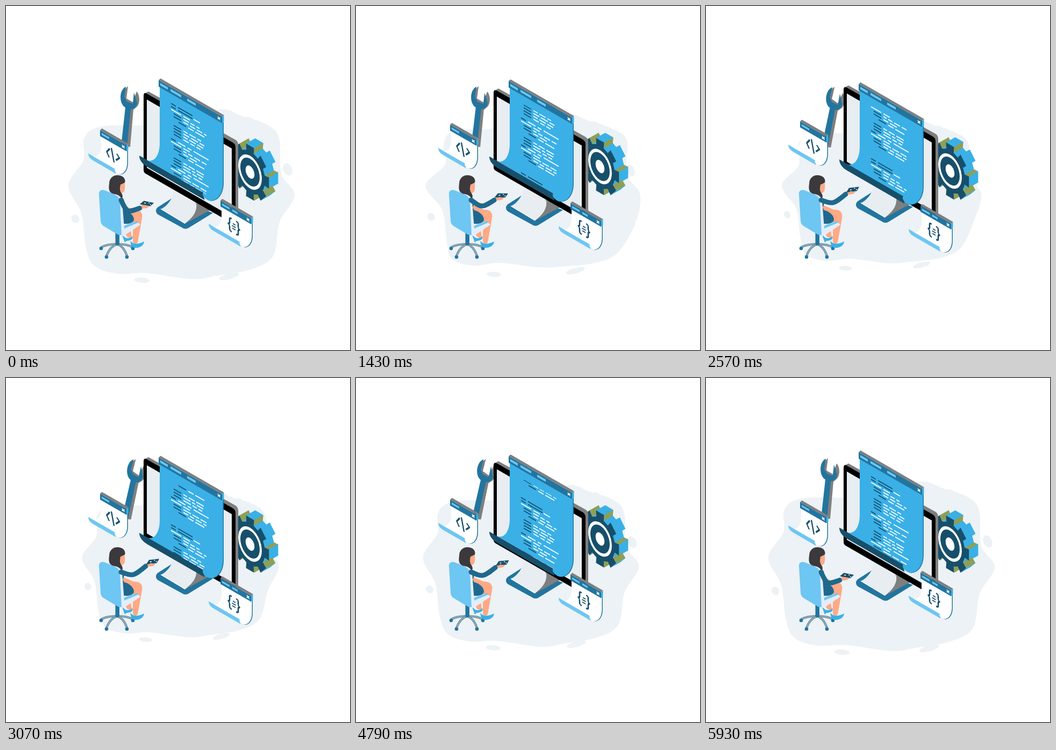
Recreate the animation shown at these times as an HTML page. Size 640 px wide and 640 px high, loop 6000 ms.

```html
<!DOCTYPE html>
<html lang="en">
<head>
<meta charset="utf-8">
<title>Developer at work</title>
<style>
html, body { margin: 0; width: 100%; height: 100%; overflow: hidden; background: #fff; }
svg { display: block; width: 100vw; height: 100vh; }
</style>
</head>
<body>
<svg id="stage" viewBox="0 0 640 640"></svg>
<script>
const LOOP = 6000, SLOPE = 0.577, SCROLL = 167, ROW = 5.4;
const C = {
  blue: '#3ab0e7', mid: '#22759f', navy: '#174f6b', light: '#6ec6f2', grey: '#7f7f7f', jacket: '#1f688d',
  blob: '#ecf2f5', screen: '#e7edf1', olive: '#8f9f55', skin: '#ffa985', hair: '#3b393c', pale: '#e4edfb',
};
const stage = document.getElementById('stage');

function el(parent, tag, attrs = {}) {
  const node = document.createElementNS('http://www.w3.org/2000/svg', tag);
  for (const key in attrs) node.setAttribute(key, attrs[key]);
  parent.appendChild(node);
  return node;
}
const group = (parent = stage, attrs) => el(parent, 'g', attrs);
const fill = (parent, d, color) => el(parent, 'path', { d, fill: color });
const line = (parent, d, color, width, cap = 'butt') => el(parent, 'path', {
  d, fill: 'none', stroke: color, 'stroke-width': width, 'stroke-linecap': cap, 'stroke-linejoin': 'round',
});
const move = (node, x, y) => node.setAttribute('transform', `translate(${x} ${y})`);
const poly = pts => 'M' + pts.map(p => p.join()).join('L') + 'Z';

// Easing
const ease = x => (1 - Math.cos(Math.PI * Math.min(1, Math.max(0, x)))) / 2;
const rise = (t, from, to) => ease((t - from) / (to - from));
const arc = (t, peak, power = 1) =>
  t < peak ? ease((t / peak) ** power) : rise(t, LOOP, peak);

function closedCurve(pts) {
  const n = pts.length, at = i => pts[(i + n) % n];
  let d = 'M' + pts[0].join();
  for (let i = 0; i < n; i++) {
    const [a, b, c, e] = [at(i - 1), at(i), at(i + 1), at(i + 2)];
    const p = [0, 1].map(k => b[k] + (c[k] - a[k]) / 6), q = [0, 1].map(k => c[k] - (e[k] - b[k]) / 6);
    d += `C${p} ${q} ${c}`;
  }
  return d;
}

// Backdrop
const blobPoints = [
  [395, 193], [440, 205], [490, 223], [509, 250], [512, 312], [537, 352], [509, 402],
  [497, 465], [455, 490], [390, 502], [345, 508], [262, 497], [208, 498], [165, 484],
  [149, 450], [140, 385], [116, 334], [144, 287], [146, 245], [180, 224], [290, 220],
];
// Bulges and dents of the bent blob: direction and spread in degrees, size
const bulges = [[16, 13, 26], [-22, 9, 16], [95, 40, -13], [160, 16, -15], [203, 10, -16]];
const backdrop = group();
const blob = fill(backdrop, '', C.blob);
for (const [x, y, rx, ry, turn] of [
  [453, 211, 8, 4, 15], [467, 214, 2.5, 1.5, 20], [524, 304, 8, 12, -25],
  [415, 503, 19, 5.5, -15], [253, 510, 14, 5, 4], [129, 396, 7, 8, -30],
]) el(backdrop, 'ellipse', { cx: x, cy: y, rx, ry, fill: C.blob, transform: `rotate(${turn} ${x} ${y})` });

function bentBlob(amount) {
  return closedCurve(blobPoints.map(([x, y]) => {
    const dx = x - 325, dy = y - 350, angle = Math.atan2(dy, dx) * 180 / Math.PI;
    let push = 0;
    for (const [dir, spread, size] of bulges) {
      const off = (angle - dir + 540) % 360 - 180;
      push += size * Math.exp(-((off / spread) ** 2));
    }
    const k = amount * push / Math.hypot(dx, dy);
    return [x + dx * k, y + dy * k];
  }));
}

// Wrench
const wrench = group();
fill(wrench, 'M227 149L224 172L236 179L243 159C249 165 250 180 244 187L237 193L231 262H217L224 190C214 180 213 160 227 149Z', C.grey);
fill(wrench, 'M223 150C211 155 209 181 222 189L214 262H225L232 192C239 192 244 186 244 180L238 161L236 182L225 178L220 169Z', C.mid);

// Gear
const gear = group();
function buildGear() {
  const project = (r, deg, dx = 0, dy = 0) => {
    const a = deg * Math.PI / 180, x = r * Math.cos(a), y = r * Math.sin(a);
    return [454 + 0.72 * x + dx, 309 + 0.42 * x + y + dy];
  };
  const corners = [];
  for (let k = 0; k < 8; k++)
    for (const [r, a] of [[39, -14], [50, -12], [50, 12], [39, 14]]) corners.push([r, 45 * k + a]);
  const depth = [17, -9.5];
  const front = corners.map(c => project(...c)), back = corners.map(c => project(...c, ...depth));
  fill(gear, poly(back), C.blue);
  front.forEach((p, i) => {
    const j = (i + 1) % front.length, q = front[j];
    const facing = (q[1] - p[1]) * depth[0] - (q[0] - p[0]) * depth[1];
    if (facing > 0) fill(gear, poly([p, q, back[j], back[i]]), i % 2 ? C.blue : C.olive);
  });
  fill(gear, poly(front), C.navy);
  [[30.5, '#fff'], [25, C.navy], [11.5, '#fff']].forEach(([r, color]) =>
    el(gear, 'circle', { r, fill: color, transform: 'matrix(.72 .42 0 1 454 309)' }));
}
buildGear();

// Monitor
const monitor = group();
fill(monitor, 'M279 381Q279 377 283 374L308 358L385 385L341 412Q334 417 327 412L283 388Q279 385 279 381Z', C.mid);
fill(monitor, 'M352 366C357 385 345 393 333 405L372 384L386 377Z', C.grey);
fill(monitor, 'M312 343L354 368C356 385 345 395 333 405L288 378C300 372 310 360 312 343Z', C.screen);
line(monitor, 'M288 377.5L333 404.5', '#fff', 1.2);
fill(monitor, 'M257 163L265 159L427 249Q432 252 432 259V398L424 405Z', C.grey);
fill(monitor, 'M256 167Q256 160 262 163L422 254Q427 257 427 263V400Q427 408 420 404L260 312Q256 310 256 305Z', '#000');
fill(monitor, 'M262 174L420 265V392L262 301Z', C.screen);

// A sheet with a title bar and a rolled lower edge, in skewed coordinates
function makeSheet({ x, y, w, bar, roll, curl, paper, back, tabs }) {
  const outer = group();
  const g = group(outer, { transform: `matrix(1 ${SLOPE} 0 1 ${x} ${y})` });
  const tip = 2 - curl, end = w + 3 - curl, h = curl * 0.33, right = w + 1.5;
  const at = (u, v) => `${end + u * curl} ${roll + v * curl}`;
  const body = `M2 ${bar - 3}H${right}V${roll - 1.05 * curl}C${right} ${roll - 0.5 * curl} ${at(0.7, 0)} ${at(0.35, 0.2)}`
    + `C${at(0.15, 0.315)} ${at(-0.12, 0.2)} ${at(0, 0)}H${-0.53 * curl}`
    + `C${-0.2 * curl} ${roll - 0.1 * curl} 2 ${roll - 0.6 * curl} 2 ${roll - 1.2 * curl}Z`;
  el(g, 'path', { d: body, fill: C.mid, transform: 'translate(1.5 -.4)' });
  fill(g, `M${tip} ${roll}C${tip} ${roll + h * 0.8} ${tip + curl * 0.2} ${roll + h} ${tip + curl * 0.4} ${roll + h}`
    + `H${end + 0.06 * curl}L${end} ${roll}Z`, back);
  fill(g, body, paper);
  fill(g, `M0 0L3.5 -5.2H${w + 3.5}L${w} 0Z`, C.grey);
  fill(g, `M${w} 0L${w + 3.5} -5.2V${bar - 5}L${w} ${bar}Z`, C.blue);
  fill(g, `M0 0H${w}V${bar}H0Z`, C.mid);
  for (const [a, b] of tabs) fill(g, `M${a} 3.5H${b}V${bar - 4}H${a}Z`, C.light);
  line(g, `M${w - 8} ${bar / 2 - 2}l4.4 4.4m0 -4.4l-4.4 4.4`, '#fff', 1.8);
  return { outer, g };
}

const page = makeSheet({
  x: 284, y: 138, w: 118, bar: 12, roll: 161, curl: 38, paper: C.blue, back: C.navy,
  tabs: [[3, 17], [22, 42], [53, 69]],
});

// Scrolling code
const clip = el(el(stage, 'defs'), 'clipPath', { id: 'pageClip' });
el(clip, 'rect', { x: 3, y: 27.5, width: 114, height: 133.5 });
const code = group(group(page.g, { 'clip-path': 'url(#pageClip)' }));
function buildCode() {
  const rowKinds = {
    title: 'd0-9 d13-40', note: 'd0-9 d13-40 w42-54', open: 'w0-19 w23-35',
    head: 'd0-9 w13-27 w31-38 w42-70', inner: 'd14-28 w32-42 w45-62',
  };
  let seed = 11;
  const random = () => (seed = seed * 16807 % 2147483647) / 2147483647;
  const statement = () => {
    let out = 'd5-19', u = 23;
    const stop = 48 + random() * 16;
    while (u < stop) {
      const len = 6 + Math.round(random() * 8);
      out += ` w${u}-${Math.min(u + len, 66)}`;
      u += len + 3;
    }
    return out;
  };
  const blocks = {
    30: 'title note open code code inner', 68: 'code code code code', 95: 'head open code code inner',
    128: 'code code code', 145: 'head open code code inner',
  };
  const paths = { d: '', w: '' };
  for (const top in blocks) blocks[top].split(' ').forEach((kind, i) => {
    for (const part of (rowKinds[kind] || statement()).split(' ')) {
      const [a, b] = part.slice(1).split('-').map(Number);
      for (const shift of [0, SCROLL]) paths[part[0]] += `M${23 + a} ${+top + i * ROW + shift}H${23 + b}`;
    }
  });
  line(code, paths.d, C.navy, 2);
  line(code, paths.w, '#fff', 2);
}
buildCode();

const small = { bar: 11, roll: 56, curl: 24, paper: '#fff', back: C.light };
const tagSheet = makeSheet({ ...small, x: 175, y: 231, w: 49, tabs: [[3, 17]] });
line(tagSheet.g, 'M18 24L12.5 33L17 41M21 21L26 45M31 26L36 31L29.5 39', C.navy, 2.6);
const braceSheet = makeSheet({ ...small, x: 399, y: 362, w: 57, tabs: [[3, 17], [22, 32]] });
for (const side of [-1, 1])
  el(line(braceSheet.g, 'M4 -12Q8 -13 8 -9V-4Q8 -1 10.5 0Q8 1 8 4V9Q8 12 4 12', C.navy, 2.6),
    'desc').parentNode.setAttribute('transform', `translate(25 34) scale(${side} 1)`);
line(braceSheet.g, 'M23 29.5H28M21.5 34H28.5M22 38.5H28', C.navy, 2);

// Chair and woman
const person = group();
for (const [x, y, knee] of [[177, 451, 443], [236, 451, 443], [187, 467, 447], [225, 467, 447]]) {
  const leg = `M207 443Q${(207 + x * 2) / 3} ${knee} ${x} ${y - 2}`;
  line(person, leg, C.grey, 4);
  line(person, leg, C.light, 1.5);
  el(person, 'circle', { cx: x, cy: y, r: 3.3, fill: C.mid });
}
fill(person, 'M203.5 420H211V444Q207 447 203.5 444Z', C.mid);
fill(person, 'M216 426L222 431Q229 434 235 428Q238 436 224 437L221 440Z', C.blue);
fill(person, 'M221 418L232 416L234 430Q228 433 224 428Z', C.skin);
fill(person, 'M217 370L238 379C250 378 255 385 253 395L245 440Q240 445 236 439L236 418L239 402L218 404Z', C.skin);
fill(person, 'M231 437Q240 447 257 438C256 447 248 450 238 450L233 446Z', C.blue);
fill(person, 'M206 350L217 357C222 362 220 370 217 375L220 380C230 382 238 390 238 397C238 405 224 407 215 404Z', C.jacket);
fill(person, 'M219 409L244 400L248 405L220 421Z', C.light);
fill(person, 'M185 342L207 350Q215 353 216 362L220 414L246 403L250 407L223 425Q215 430 210 425Z', C.pale);
fill(person, 'M173 351C172 343 178 341 184 343L203 351Q211 355 212 363L215 426Q210 427 206 424L181 409Q176 405 176 399Z', C.light);
fill(person, 'M192 331C192 318 202 314 210 315C220 316 223 324 221 329C213 331 211 338 213 345C216 350 219 355 215 358Q210 351 203 350C193 349 190 343 192 331Z', C.hair);
fill(person, 'M213 332Q219 331 221 328Q222 339 220 345L215 349Q211 340 213 332Z', C.skin);
const sleeve = line(person, '', C.jacket, 9, 'round');
const hand = group(person);
fill(hand, 'M0 -4L9 -5L15 -2L10 2L1 3Z', C.skin);
const card = group(hand);
fill(card, 'M-13 2L-6 -5L13 -3L7 4Z', C.navy);
line(card, 'M-5 -1h3M3 -2h2M6 1h2', '#fff', 1.6);
line(hand, 'M6 -2L12 -1', C.skin, 3, 'round');

function render(t) {
  const swing = ease(2 * Math.min(t, LOOP - t) / LOOP);
  blob.setAttribute('d', bentBlob(rise(t, 0, 1400) - rise(t, 2050, 3600)));
  backdrop.setAttribute('transform', `translate(305 335) scale(${1 - 0.133 * swing}) translate(-305 -335)`);
  wrench.setAttribute('transform', `rotate(${6.7 * (rise(t, 1050, 3100) - rise(t, 4850, 5930))} 220 275)`);
  move(gear, 0, -5.2 * (1 - Math.cos(4 * Math.PI * t / LOOP)));
  move(monitor, 0, -11.8 * swing);
  move(page.outer, 0, 12.2 * arc(t, 3880, 1.45));
  move(code, 0, -SCROLL * t / LOOP);
  move(tagSheet.outer, 0, -16.3 * arc(t, 2700, 0.85));
  move(braceSheet.outer, 0, 10.3 * swing);

  const lift = Math.max(0, rise(t, 0, 2600) - rise(t, 4500, 5930)), reach = Math.sqrt(lift);
  const wrist = [252 + 11 * reach, 374 - 26 * lift];
  const elbow = [225 + 12 * reach, 385 - 16 * lift];
  sleeve.setAttribute('d', `M214 361C${elbow} ${elbow} ${wrist[0] - 3} ${wrist[1] + 2}`);
  move(hand, ...wrist);
  card.setAttribute('transform', `translate(10 -6) rotate(${5 - 18 * lift})`);
}

function frame() {
  render(performance.now() % LOOP);
  requestAnimationFrame(frame);
}
frame();
</script>
</body>
</html>
```
